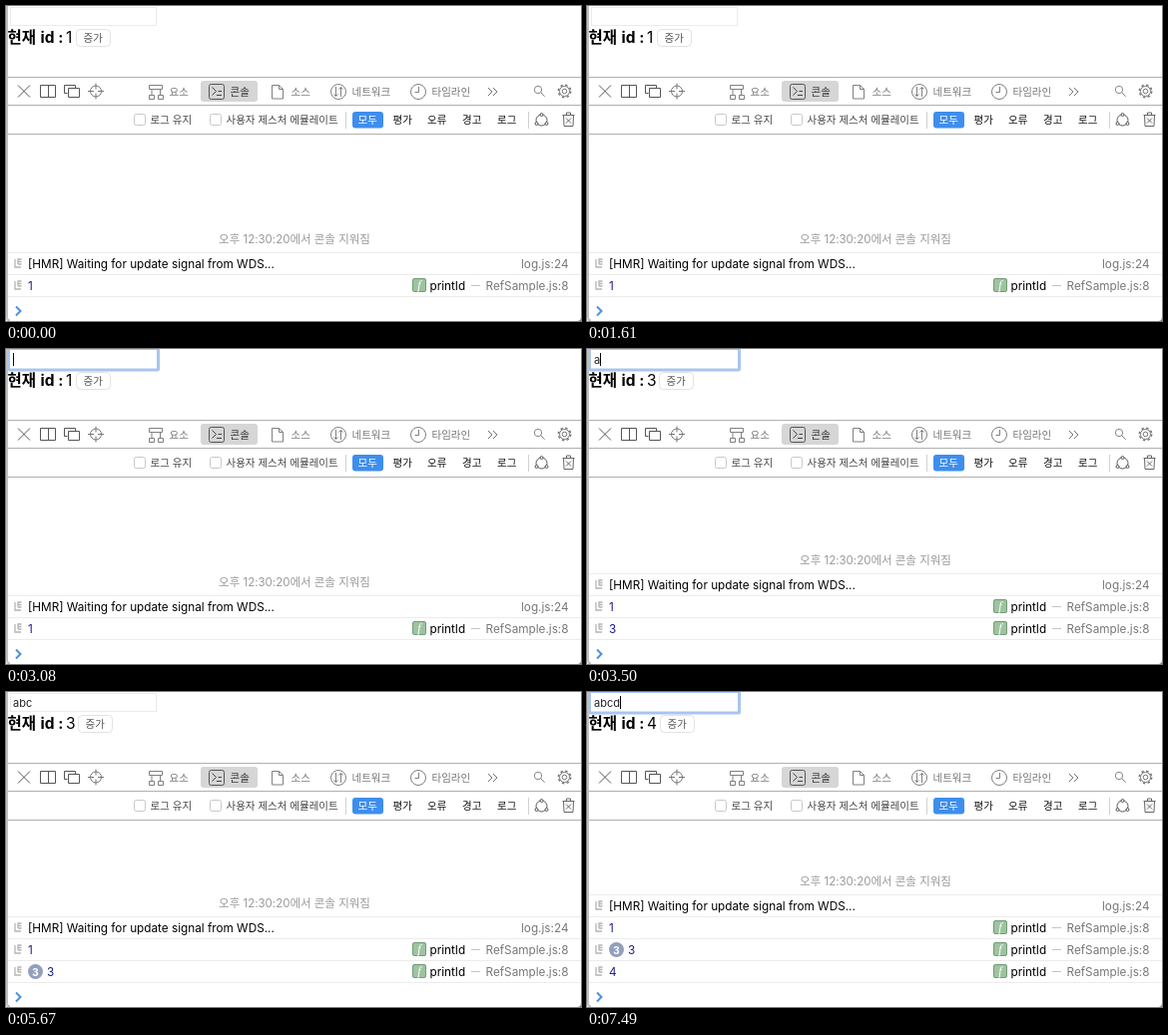
These frames come from a looping animation (576 by 316 pixels, 8000 ms). An HTML page:

```html
<!DOCTYPE html>
<html lang="ko">
<head>
<meta charset="utf-8">
<title>Ref sample console</title>
<style>
html, body { margin: 0; width: 100%; height: 100%; overflow: hidden; background: #fff; }
svg { display: block; width: 576px; height: 316px; }
text { font: 11.75px Inter, "Noto Sans CJK KR", sans-serif; white-space: pre; }
.ko { font: 10.5px "Noto Sans CJK KR", sans-serif; }
.cleared { font-size: 11.5px; }
.title { font-size: 15.5px; }
.bold { font-weight: 700; }
.field { font-size: 11px; }
.badge { font-size: 10.5px; font-weight: 700; }
.italic { font: italic 12px "Liberation Serif", serif; }
.icon { fill: none; stroke: #777; stroke-width: 1; }
.end { text-anchor: end; }
.mid { text-anchor: middle; }
</style>
</head>
<body>
<svg viewBox="0 0 576 316">
  <defs>
    <linearGradient id="pressed" x2="0" y2="1">
      <stop stop-color="#6cb2fa"/><stop offset="1" stop-color="#1474f6"/>
    </linearGradient>
  </defs>
  <rect width="576" height="316" fill="#fff"/>
  <path d="M0 71.5H576M0 99.5H576M0 128.5H576" stroke="#b0b0b0"/>
  <rect x="195" y="75" width="57" height="21" rx="3" fill="#d6d6d6"/>

  <g class="icon">
    <path d="M12 79.500l12 12M24 79.500l-12 12" stroke="#555"/>
    <path d="M34.500 79.500h15v12h-15zM42.500 79.500v12" stroke="#555"/>
    <path d="M61.500 87.500h-3v-8h11v3M62.500 82.500h11v9h-11z" stroke="#555"/>
    <circle cx="90" cy="85.500" r="5.500"/>
    <path d="M90 77.500v6M90 87.500v6M82 85.500h6M92 85.500h6"/>
    <path d="M143.500 79.500h13v4h-13zM143.500 89.500h5v4h-5zM152.500 89.500h5v4h-5zM146 83.500v6M154.500 83.500v6" stroke="#808080"/>
    <rect x="203.500" y="78.500" width="15" height="15" rx="2" stroke="#555"/>
    <path d="M206.500 81.500l4 4l-4 4M211 89.500h5M212.500 85.500h3.500" stroke="#444"/>
    <path d="M266.500 79.500h7l4 4v9.500h-11zM273.500 79.500v4h4" stroke="#808080"/>
    <circle cx="333" cy="86" r="7.500" stroke="#808080"/>
    <path d="M330.500 81v9.500M328.500 88.500l2 2l2-2M335.500 91v-9.500M333.500 83.500l2-2l2 2" stroke="#808080"/>
    <circle cx="413" cy="86" r="7.500" stroke="#808080"/>
    <path d="M413.500 81v5.500h-4" stroke="#808080"/>
    <path d="M483 82l4 4l-4 4M488 82l4 4l-4 4"/>
    <circle cx="533" cy="84" r="3.700" stroke="#888"/>
    <path d="M535.700 86.700l4 4" stroke="#888"/>
    <circle cx="559.500" cy="85.500" r="5"/>
    <circle cx="559.500" cy="85.500" r="2.300"/>
    <circle cx="559.500" cy="85.500" r="6.200" stroke-width="1.500" stroke-dasharray="2.430"/>
    <rect x="128.500" y="108.500" width="11" height="11" rx="2" fill="#fff" stroke="#c8c8c8"/>
    <rect x="204.500" y="108.500" width="11" height="11" rx="2" fill="#fff" stroke="#c8c8c8"/>
    <path d="M340.500 106v17M523.500 106v17" stroke="#d0d0d0"/>
    <g stroke="#555" fill="#fff">
      <circle cx="536.500" cy="114.500" r="5.500"/>
      <circle cx="536.500" cy="109" r="1.500"/>
      <circle cx="531.500" cy="118" r="1.500"/>
      <circle cx="541.500" cy="118" r="1.500"/>
    </g>
    <path d="M557.500 109.500h12M561.500 109v-2h4v2M558.500 109.500l.5 11h9l.5-11M561 112.500l5 5M566 112.500l-5 5" stroke="#666"/>
  </g>
  <rect x="347" y="106" width="31" height="16.500" rx="3" fill="#3e8eed"/>
  <g id="labels"></g>
  <path d="M10 301.500l4.500 4.500l-4.500 4.500" fill="none" stroke="#4a92e0" stroke-width="2"/>
  <g id="live"></g>
  <path d="M1 0V312q0 3.500 3 3.500" fill="none" stroke="#c0c0c0" stroke-width="2"/>
  <path d="M576 312v4h-4q4 0 4-4" fill="#888"/>
</svg>
<script>
const LOOP = 8000;
const $ = id => document.getElementById(id);
const text = (x, y, s, cls = '', fill = '#000') =>
  `<text x="${x}" y="${y}" class="${cls}" fill="${fill}">${s}</text>`;
const rect = (x, y, w, h, r, fill, stroke, line = 1) =>
  `<rect x="${x}" y="${y}" width="${w}" height="${h}" rx="${r}" fill="${fill}" stroke="${stroke}" stroke-width="${line}"/>`;

const tabs = [['요소', 164], ['콘솔', 225], ['소스', 286], ['네트워크', 347], ['타임라인', 427]];
const options = [['로그 유지', 145], ['사용자 제스처 에뮬레이트', 221]];
const filters = [['모두', 353], ['평가', 388], ['오류', 422.5], ['경고', 457.5], ['로그', 492.5]];
$('labels').innerHTML =
  tabs.map(([s, x]) => text(x - .5, 89.5, s, 'ko', s === '콘솔' ? '#333' : '#777')).join('') +
  options.map(([s, x]) => text(x - .5, 118, s, 'ko', '#444')).join('') +
  filters.map(([s, x]) => text(x - .5, 118, s, 'ko', s === '모두' ? '#fff' : '#111')).join('');

const between = (t, a, b) => t >= a && t < b;

function stateAt(t) {
  const typed = [3500, 4270, 4830, 7490].filter(k => t >= k).length;
  const focus = between(t, 3080, 5460) || t >= 7070;
  return {
    typed, focus,
    caret: focus && !between(t, 4060, 4270),
    pressed: between(t, 1540, 1610) || between(t, 2240, 2310) || between(t, 5530, 5670),
    id: t < 3500 ? 1 : t < 7490 ? 3 : 4,
    repeats: t < 4340 ? 1 : t < 4900 ? 2 : 3
  };
}

function field({ typed, focus, caret }) {
  const x = 7.5 + [0, 6, 13, 19, 26][typed];
  return (focus ? rect(2.5, -.5, 150, 21.5, 1, '#fff', '#a8c5ed', 3)
                : rect(4.5, 1.5, 146, 18, 0, '#fff', '#ebebeb')) +
    text(7, 15, 'abcd'.slice(0, typed), 'field', '#222') +
    (caret ? `<path d="M${x} 4v13" stroke="#000"/>` : '');
}

function heading({ id, pressed }) {
  const x = { 1: 70.5, 3: 72.5, 4: 73.5 }[id];
  return text(1.5, 36.5, '현재', 'title bold') + text(34.5, 36.5, 'id :', 'title bold') +
    text(60, 36.5, id, 'title') +
    rect(x, 23.5, 34, 17, 4, pressed ? 'url(#pressed)' : '#fff', pressed ? '#3a86ee' : '#e2e2e2') +
    text(x + 7, 36, '증가', 'ko', pressed ? '#fff' : '#555');
}

function logRow(y, value, count) {
  const base = y + 4.5;
  const frame = `<path d="M2 ${y - 10.5}H576M2 ${y + 11.5}H576" stroke="#ececec"/>` +
    `<path d="M9 ${y - 4}v8h6M12 ${y + 1}v-5h3.500M12 ${y - 1.5}h3.500M12 ${y + 1}h3.500" fill="none" stroke="#b4b4b4" stroke-width="1.300"/>`;
  if (value === 0) return frame +
    text(22, base, '[HMR] Waiting for update signal from WDS...') +
    text(563.5, base, 'log.js:24', 'end', '#777');
  const badge = count > 1 ? rect(22, y - 7, 15, 15, 7.5, '#929fbd', 'none') +
    text(29.5, base, count, 'badge mid', '#fff') : '';
  return frame + badge +
    text(count > 1 ? 41 : 22, base, value, '', '#1c1c90') +
    rect(407.5, y - 6.5, 13, 13, 1.5, '#9fc3a0', '#719d75') +
    text(414, y + 4, 'f', 'italic mid', '#fff') +
    text(424.5, base, 'printId') +
    `<path d="M466 ${y + .5}h9" stroke="#c4c4c4"/>` +
    text(563.5, base, 'RefSample.js:8', 'end', '#777');
}

function consoleRows({ id, repeats }) {
  const rows = [0, 1, 3, 4].filter(v => v <= id);
  const top = 280 - 22 * (rows.length - 1);
  return text(289, top - 20.5, '오후 12:30:20에서 콘솔 지워짐', 'cleared mid', '#999') +
    rows.map((v, i) => logRow(top + 22 * i, v, v === 3 ? repeats : 1)).join('');
}

let shown;
function frame(now) {
  const state = stateAt(now % LOOP);
  const key = JSON.stringify(state);
  if (key !== shown) {
    shown = key;
    $('live').innerHTML = heading(state) + field(state) + consoleRows(state);
  }
  requestAnimationFrame(frame);
}
frame(0);
</script>
</body>
</html>
```
